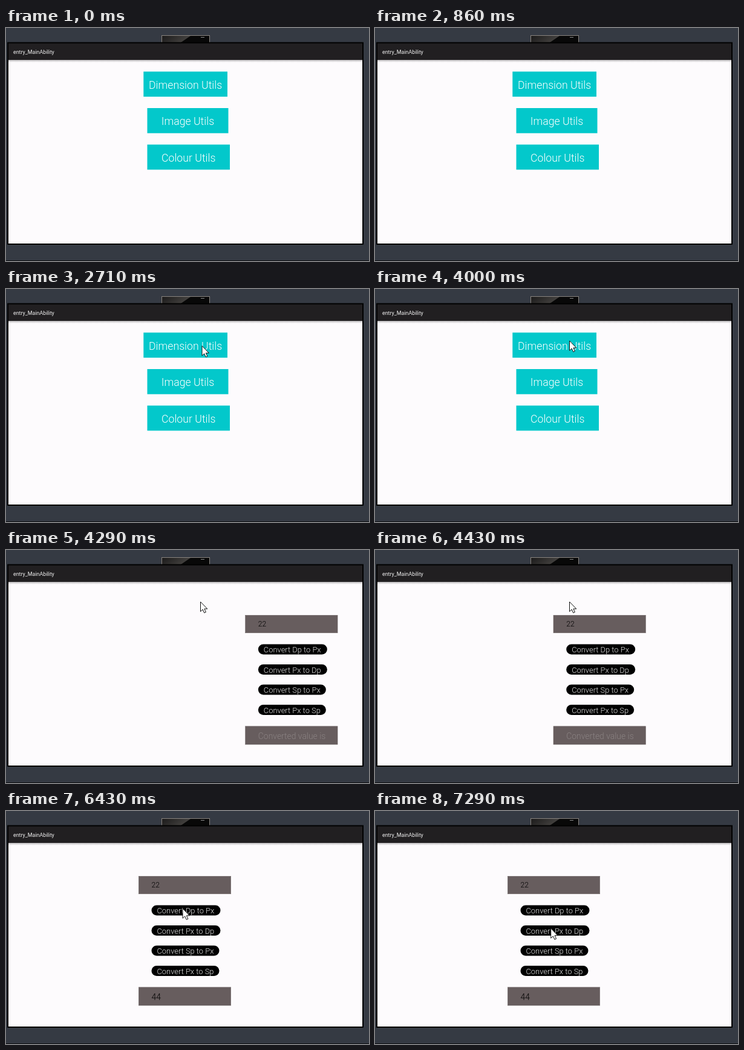
An HTML page that plays this animation: 600x387 px, repeating every 8 s.

```html
<!DOCTYPE html>
<html lang="en">
<head>
<meta charset="utf-8">
<title>Utility demo</title>
<style>
  html, body { margin: 0; width: 100%; height: 100%; overflow: hidden; background: #353a43; }
  svg { display: block; width: 100%; height: 100%; }
  text { font-family: Roboto, "Noto Sans", sans-serif; font-weight: 300; }
  .title { font-size: 8.9px; font-weight: 400; fill: #f0f0f0; }
  .button rect { fill: #03c8cb; }
  .button text { fill: #fff; font-size: 17.7px; text-anchor: middle; }
  .pill text { fill: #e4e4e4; font-size: 12.9px; }
  .page { fill: #fdfbfd; }
  .field { fill: #675d5e; stroke: #746b6b; stroke-width: .6; }
  .result { font-size: 13.9px; }
</style>
</head>
<body>
<svg viewBox="0 0 600 387">
  <defs>
    <linearGradient id="gloss" x2="1" y2=".3">
      <stop stop-color="#1c1b1b"/>
      <stop offset="1" stop-color="#454341"/>
    </linearGradient>
    <linearGradient id="shade" x2="0" y2="1">
      <stop stop-color="#bbb9bb"/>
      <stop offset="1" stop-color="#fdfbfd"/>
    </linearGradient>
    <clipPath id="screen"><rect x="4" y="53" width="585" height="305"/></clipPath>
  </defs>

  <rect width="600" height="387" fill="#353a43"/>
  <rect y="386" width="600" height="1" fill="#0b0c0e"/>

  <g id="device">
    <rect x="257.5" y="12.5" width="79" height="13" fill="#080808" stroke="#89847f"/>
    <path d="M258 13H305L289 24H258Z" fill="url(#gloss)"/>
    <path d="M322 15.5h6" stroke="#aaa" stroke-width=".8"/>
  </g>

  <rect x="2" y="23.5" width="589" height="336.5" fill="#000"/>
  <rect x="4" y="25.5" width="585" height="28" fill="#211f21"/>
  <text class="title" x="12" y="42.6">entry_MainAbility</text>

  <g clip-path="url(#screen)">
    <rect class="page" x="4" y="53" width="585" height="305"/>
    <g id="home"></g>
    <g id="converter">
      <rect class="page" x="4" y="53" width="585" height="305"/>
      <rect class="field" x="219.3" y="108.3" width="152.4" height="29.4"/>
      <text x="240.5" y="127.4" font-size="12.1">22</text>
      <g id="pills"></g>
      <rect class="field" x="219.3" y="292.8" width="152.4" height="30.2"/>
      <text id="result" class="result" x="240.5" y="314"></text>
    </g>
    <rect x="4" y="53" width="585" height="4" fill="url(#shade)"/>
  </g>

  <path id="cursor" d="M0 0V16.2L3.7 12.8L6.2 18.4L8.9 17.2L6.4 11.8H11.4Z"
        fill="#fff" stroke="#111" stroke-linejoin="round"/>
</svg>
<script>
const FPS = 7, LOOP = 8 * FPS; // all times below are in ticks of 1/7 s
const byId = id => document.getElementById(id);

const buttons = [['Dimension', 227.3, 366], ['Image', 233.5, 367.5], ['Colour', 233.5, 370]];
byId('home').innerHTML = buttons.map(([name, left, right], i) => {
  const y = 72.4 + i * 60.6;
  return `<g class="button"><rect x="${left}" y="${y}" width="${right - left}" height="41.7"/>
    <text x="${(left + right) / 2}" y="${y + 28.2}">${name} Utils</text></g>`;
}).join('');

byId('pills').innerHTML = ['Dp to Px', 'Px to Dp', 'Sp to Px', 'Px to Sp'].map((units, i) => {
  const y = 156.5 + i * 33.5, width = units.includes('Dp') ? 114 : 112;
  return `<g class="pill"><rect x="240.5" y="${y}" width="${width}" height="17" rx="8.5"/>
    <text x="249.5" y="${y + 13.7}">Convert ${units}</text></g>`;
}).join('');

const progress = (tick, start, end) => Math.min(1, Math.max(0, (tick - start) / (end - start)));
const smooth = p => p * p * (3 - 2 * p);

const pointer = { x: 157, y: 344, enter: 16 };
const moves = [
  { start: 16, end: 19, x: 324, y: 94.5 },
  { start: 19, end: 22, x: 321.5, y: 86 },
  { start: 32, end: 37, x: 292, y: 162 },
  { start: 45, end: 51, x: 290.7, y: 195 },
];
const slide = { start: 28, end: 34.07, distance: 585 };
const convertAt = 44;

function place(id, x, y = 0) {
  byId(id).setAttribute('transform', `translate(${x} ${y})`);
}

function draw(tick) {
  let { x, y } = pointer;
  for (const move of moves) {
    const p = smooth(progress(tick, move.start, move.end));
    x += (move.x - x) * p;
    y += (move.y - y) * p;
  }
  place('cursor', x, y);
  byId('cursor').setAttribute('opacity', tick < pointer.enter ? 0 : 1);

  const remaining = 1 - progress(tick, slide.start, slide.end);
  place('converter', slide.distance * remaining ** 3);

  const converted = tick >= convertAt;
  byId('result').textContent = converted ? '44' : 'Converted value is';
  byId('result').setAttribute('fill', converted ? '#000' : '#8a8282');
}

function loop() {
  // The small lead absorbs times rounded to 10 ms.
  draw(Math.floor(performance.now() * FPS / 1000 + .04) % LOOP);
  requestAnimationFrame(loop);
}
loop();
</script>
</body>
</html>
```
